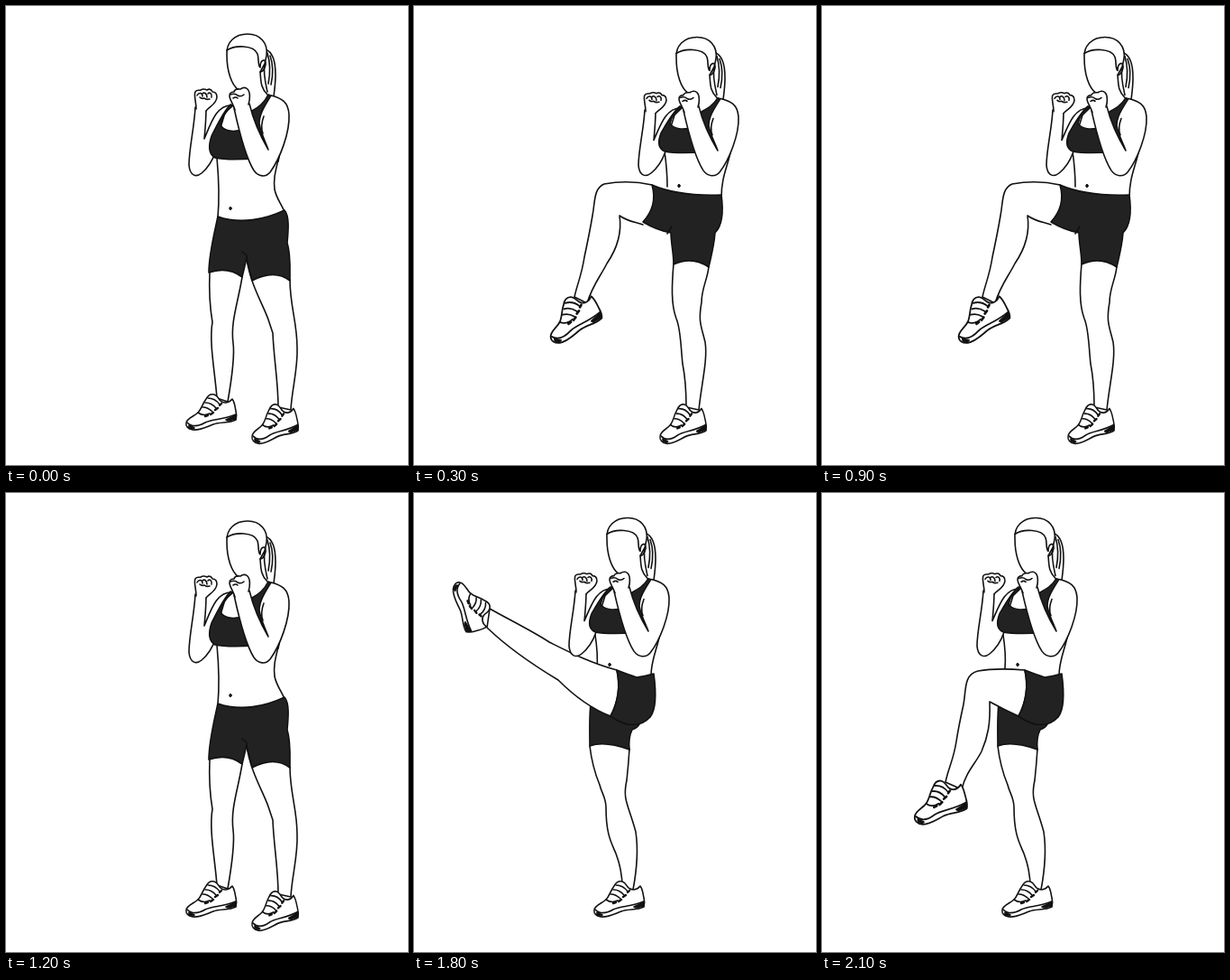
Recreate the animation shown at these times as an HTML page. Size 446 px wide and 508 px high, loop 2400 ms.

```html
<!DOCTYPE html>
<html lang="en">
<head>
<meta charset="utf-8">
<title>Front kicks</title>
<style>
html, body { margin: 0; width: 100%; height: 100%; overflow: hidden; background: #fff; }
svg { display: block; }
</style>
</head>
<body>
<svg id="stage" width="446" height="508" viewBox="0 0 446 508" fill="#fff" stroke="#111" stroke-width="1.6" stroke-linecap="round" stroke-linejoin="round"></svg>
<script>
const skin = d => `<path d="${d}"/>`;
const line = d => `<path d="${d}" fill="none"/>`;
const cloth = d => `<path d="${d}" fill="#222"/>`;
const navel = (x, y) => `<ellipse cx="${x}" cy="${y}" rx="1.2" ry="1.7" fill="#111" stroke-width="1"/>`;

// The toe tip is the origin of a shoe.
const shoe = (x, y, turn = 0, sx = 1, sy = 1) =>
  `<g transform="translate(${x} ${y}) rotate(${turn}) scale(${sx} ${sy})">` +
  skin('M50 -27C53 -23 53 -18 54 -14C55 -10 55 -7 54 -4C46 0 37 -2 29 1C21 4 14 8 6 7C1 6 -2 3 -1 -1C0 -6 8 -8 12 -12C16 -16 17 -22 21 -27C23 -31 26 -33 30 -32C34 -31 34 -28 37 -25C40 -22 46 -22 50 -27Z') +
  line('M0 -1C6 5 13 3 20 -1C28 -5 40 -4 54 -10M12 -12C16 -9 21 -9 25 -11M17 -18Q23 -18 28 -13M20 -23Q27 -23 32 -17M23 -28Q31 -28 36 -21') +
  '<path d="M20 -8l3 -1M26 -10l3 -2M31 -15l3 -2M36 -20l2 -2" stroke-width="2.4"/>' +
  '<path d="M43 -4L54 -9L54 -5L45 -3ZM2 2L8 5L6 6L2 4Z" fill="#111"/></g>';

const head =
  line('M288 48C296 51 299 62 299 76C299 86 298 92 297 100M287 64C285 74 288 86 290 95M290 52C293 62 293 76 291 86M293 55C297 66 296 78 294 87') +
  skin('M258 93C250 87 245 72 245 54C244 40 254 31 268 31C282 31 291 41 289 55L287 64L282 73C283 83 282 90 290 98') +
  line('M245 49C254 43 275 43 279 53C281 59 279 65 282 68C282 58 289 58 288 65C287 69 285 73 282 73');

const farArm = skin('M210 112C209 134 203 158 203 176C204 188 211 190 217 185C223 180 229 172 233 160L234 148L243 118L251 110C234 109 228 128 220 147C221 136 222 126 222 114') +
  skin('M211 114C211 106 208 98 210 95C212 92 214 94 216 93C219 91 221 92 223 93C226 91 228 93 229 95C232 95 234 97 234 101C233 109 226 111 222 116') +
  line('M212 99C214 95 218 96 218 100M218 97C220 95 223 97 223 101M224 97C226 95 229 97 228 101M215 101Q217 103 220 102Q222 104 226 103');

const nearArm = skin('M253 113C258 136 265 166 275 182C280 189 288 190 293 184C304 169 315 140 314 120C313 106 306 102 294 99C288 109 281 119 281 130C283 142 288 150 291 159C284 147 275 129 270 108') +
  line('M286 122C283 130 283 136 285 141') +
  skin('M254 115C252 108 248 104 248 99C248 96 251 95 253 95C254 91 258 92 260 92C263 90 266 90 268 92C271 95 271 103 269 109') +
  line('M249 98Q254 96 257 99Q261 101 264 98M252 102Q255 100 257 102');

const bra = cloth('M249 109C241 117 234 132 228 144C224 156 225 164 232 168C245 171 260 170 276 169L302 172L305 157L288 145L285 117L295 100L291 98C286 108 280 112 273 116L264 136C252 141 242 138 238 132C239 124 244 116 252 110Z');

const squash = (part, k) => `<g transform="translate(0 ${98 * (1 - k)}) scale(1 ${k})">${part}</g>`;
const upper = (x, y, braK = 1, armK = 1) =>
  `<g transform="translate(${x} ${y})">${head}${squash(farArm, armK)}${squash(bra, braK)}${squash(nearArm, armK)}</g>`;

const leftShoe = shoe(201, 462);
const rightShoe = shoe(274, 477, -3, .93, 1.08);

const stand =
  line('M234 168C236 190 237 212 235 234M304 160C301 178 296 188 298 203C300 213 306 220 309 228') + navel(249, 224) +
  skin('M226 295C225 318 227 338 229 350C225 372 232 406 234 434L246 438C250 415 254 388 252 373C249 350 257 330 262 300') +
  skin('M267 280C271 308 286 332 291 347L296 362C297 390 302 415 302 444L316 447C317 425 324 402 323 378C323 350 315 332 315 303') +
  leftShoe + rightShoe +
  cloth('M235 233C260 242 288 236 309 226C315 233 313 250 312 262C316 275 315 290 315 304C302 294 286 297 273 304L267 279L262 300C250 291 237 291 225 295C225 275 231 252 235 233Z') +
  line('M262 272L267 276L267 281') + upper(0, 0);

const kneeA = skin('M264 198C242 193 222 195 211 197C199 202 201 217 198 232C195 250 192 264 189 278C186 298 181 308 178 322L192 329C198 309 207 299 214 285C225 269 231 252 228 232C236 238 245 239 254 242') +
  shoe(153, 367, -17, 1.1, 1.15);
const kickA = skin('M264 198C242 190 222 177 205 167C185 152 165 141 144 127L141 148C165 175 194 194 213 206C226 221 238 230 254 241') +
  shoe(110, 99, 86);

const poseA = leg =>
  line('M278 161C280 175 281 187 281 200M352 158C348 178 341 189 341 212') + navel(294, 199) +
  skin('M288 285C286 309 285 330 291 346C296 357 296 378 298 396C302 416 302 430 302 444L316 447C319 417 326 392 323 372C319 355 315 350 319 328C319 312 326 302 327 288') +
  rightShoe + leg +
  cloth('M264 198C285 207 315 210 341 209C344 231 341 244 334 251C333 265 330 276 327 289C314 280 301 280 288 286C288 273 285 262 285 251C274 249 264 245 254 239C266 226 268 212 264 198Z') +
  line('M281 252L286 244') + upper(46, 3.5, .85, .96);

// Both raised legs end along the hem, so that they cover the far leg.
const hemB = 'C226 232 229 214 225 196';
const kneeB = skin('M225 196C202 194 184 195 173 197C157 201 160 218 157 234C153 252 151 262 149 275C146 295 140 305 137 320L155 328C160 308 170 300 177 286C184 270 187 255 186 231C197 237 207 242 218 247' + hemB) +
  shoe(104, 359, -5, 1.06, 1.18);
const kickB = skin('M225 196C195 188 170 175 150 165C130 152 105 140 84 128L81 149C105 172 135 192 160 207C175 222 195 238 218 247' + hemB) +
  shoe(50, 100, 86);

const poseB = leg =>
  line('M201 157C203 170 204 182 203 194M274 151C270 173 263 184 263 202') + navel(217, 190) +
  skin('M195 280C197 297 201 311 206 323C208 332 213 337 213 348C213 378 219 387 224 399C229 412 231 423 231 436L243 439C247 418 249 395 246 375C238 345 231 340 236 318Q238 300 239 283') +
  leftShoe +
  cloth('M197 225C194 242 195 262 195 280C209 275 225 279 239 284C238 274 240 266 242 262Q248 260 250 256L235 235Z') + leg +
  cloth('M225 196Q238 201 247 204Q255 203 266 200C269 222 269 239 262 248C251 260 235 259 218 247C226 232 229 214 225 196Z') +
  upper(-31, -3.5, .85, .96);

const poses = [stand, poseA(kneeA), poseA(kickA), poseB(kneeB), poseB(kickB)];
const order = [0, 1, 2, 1, 0, 3, 4, 3];
const stage = document.getElementById('stage');
const start = performance.now();
let shown = -1;

function draw() {
  const pose = order[Math.floor((performance.now() - start) / 300) % order.length];
  if (pose !== shown) stage.innerHTML = poses[shown = pose];
  requestAnimationFrame(draw);
}
draw();
</script>
</body>
</html>
```
